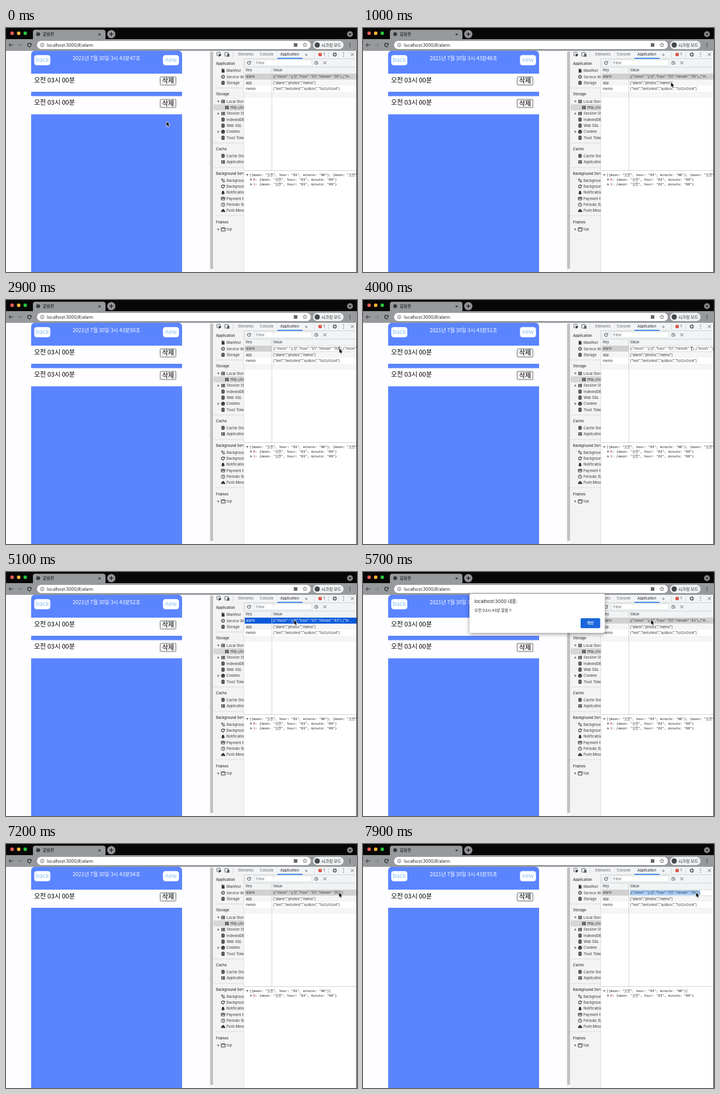
These frames come from a looping animation (600 by 417 pixels, 8 s). An HTML page with a canvas:

```html
<!DOCTYPE html>
<html lang="ko">
<head>
<meta charset="utf-8">
<style>
  html, body { margin: 0; width: 100%; height: 100%; overflow: hidden; background: #fff; }
  canvas { display: block; width: 600px; height: 417px; }
</style>
</head>
<body>
<canvas id="stage" width="600" height="417"></canvas>
<script>
const ctx = document.getElementById('stage').getContext('2d');
const UI = 'Inter, "Noto Sans CJK KR", sans-serif';
const PAGE = '"Noto Sans CJK KR", "Noto Sans CJK", sans-serif';
const MONO = '"DejaVu Sans Mono", "Noto Sans CJK KR", monospace';
const INK = '#303437', GREY = '#5f6368', BLUE = '#5b84ff';
const LOOP = 8000, STEP = 100;

// ---- drawing helpers ----
function box(x, y, w, h, fill, radius = 0, stroke) {
  ctx.beginPath();
  ctx.roundRect(x, y, w, h, radius);
  if (fill) { ctx.fillStyle = fill; ctx.fill(); }
  if (stroke) { ctx.strokeStyle = stroke; ctx.lineWidth = 1; ctx.stroke(); }
}
function disc(x, y, r, fill) {
  ctx.beginPath();
  ctx.arc(x, y, r, 0, 7);
  ctx.fillStyle = fill;
  ctx.fill();
}
function ring(x, y, r, color = GREY, width = 1, from = 0, to = 7) {
  ctx.beginPath();
  ctx.arc(x, y, r, from, to);
  ctx.strokeStyle = color;
  ctx.lineWidth = width;
  ctx.stroke();
}
function path(points, color = GREY, width = 1, fill = false) {
  ctx.beginPath();
  points.forEach(([x, y]) => ctx.lineTo(x, y));
  if (fill) { ctx.closePath(); ctx.fillStyle = color; ctx.fill(); return; }
  ctx.strokeStyle = color;
  ctx.lineWidth = width;
  ctx.stroke();
}
// y is the middle of the line of text
function text(s, x, y, size, color = INK, font = UI, weight = 400, align = 'left') {
  ctx.font = `${weight} ${size}px ${font}`;
  ctx.textAlign = align;
  ctx.fillStyle = color;
  ctx.fillText(s, x, y + size * 0.36);
}
function textWidth(s, size) {
  ctx.font = `400 ${size}px ${UI}`;
  return ctx.measureText(s).width;
}
function clipped(x, y, w, h, draw) {
  ctx.save();
  ctx.beginPath();
  ctx.rect(x, y, w, h);
  ctx.clip();
  draw();
  ctx.restore();
}
function cross(x, y, r, color = GREY, width = 1) {
  path([[x - r, y - r], [x + r, y + r]], color, width);
  path([[x - r, y + r], [x + r, y - r]], color, width);
}
function dots(x, y, color) {
  for (const d of [-3, 0, 3]) disc(x, y + d, 0.8, color);
}
function reload(x, y, r, color = GREY) {
  ring(x, y, r, color, 1.1, 0.4, 5.4);
  path([[x + r + 0.7, y - r - 0.6], [x + r + 0.7, y], [x + r - 2.4, y]], color, 1, true);
}
function triangle(x, y, open) {
  path(open ? [[x - 2, y - 1.3], [x + 2, y - 1.3], [x, y + 1.8]]
            : [[x - 1.3, y - 2], [x + 1.8, y], [x - 1.3, y + 2]], GREY, 1, true);
}

// ---- browser frame ----
function drawBrowser() {
  box(0, 0, 600, 19, '#070707');
  ['#fe5f57', '#febc2e', '#28c840'].forEach((c, i) => disc(10.5 + i * 11.2, 9, 3, c));
  box(46, 3, 124, 18, '#97999c', 4);
  disc(55, 10.5, 3.3, '#35383b');
  text('알람판', 63, 10.5, 7, '#111');
  cross(160, 11, 1.9, '#222');
  disc(180, 10.5, 7, '#929497');
  path([[176.5, 10.5], [183.5, 10.5]], '#111', 1.2);
  path([[180, 7], [180, 14]], '#111', 1.2);
  disc(588, 10.5, 5, '#85878a');
  path([[585.5, 9.5], [590.5, 9.5], [588, 12.5]], '#111', 1, true);

  box(0, 19, 600, 20, '#97999c');
  path([[12, 29], [5, 29]], '#222');
  path([[8, 26], [5, 29], [8, 32]], '#222');
  path([[20, 29], [27, 29]], '#727477');
  path([[24, 26], [27, 29], [24, 32]], '#727477');
  reload(40, 29, 3, '#222');
  box(53, 22, 468, 14, '#fff', 7);
  ring(62, 29, 3, GREY, 0.8);
  path([[62, 28.5], [62, 31]]);
  disc(62, 27.3, 0.5, GREY);
  text('localhost:3000/#/alarm', 70, 29, 7.15, '#222');
  box(492, 26, 6, 6, '#64686c');
  const star = Array.from({ length: 11 }, (_, i) => {
    const r = i % 2 ? 1.6 : 3.7, a = i * Math.PI / 5 - Math.PI / 2;
    return [511 + r * Math.cos(a), 29 + r * Math.sin(a)];
  });
  path(star, GREY, 0.8);
  box(525, 22, 52, 14, '#f1f2f3', 7);
  disc(532, 29, 4.5, '#45484c');
  text('시크릿 모드', 539, 29, 7, '#222');
  dots(588, 29, '#222');
}

// ---- alarm page ----
function pageButton(label, x, w) {
  box(x, 46.5, w, 17, '#fff', 4, '#c7dcff');
  text(label, x + w / 2, 54, 10.2, '#8fc1f5', PAGE, 300, 'center');
}
function drawPage(time, alarmCount) {
  box(0, 39, 347, 378, '#fefdff');
  box(43, 39, 258, 378, BLUE, [6, 6, 0, 0]);
  const seconds = 47 + Math.floor((time + 600) / 1000);
  text(`2021년 7월 30일 3시 43분${seconds}초`, 114, 51.5, 8.85, '#fff', PAGE);
  pageButton('back', 48.5, 27);
  pageButton('new', 268.5, 27);
  for (let i = 0; i < alarmCount; i++) {
    const y = 78 + i * 38.5;
    box(43, y, 258, 31, '#fefdff');
    text('오전 03시 00분', 48, y + 11, 11, '#000', PAGE);
    box(263.5, y + 5.5, 27, 14, '#efefef', 1, '#777');
    text('삭제', 277, y + 12.3, 10.9, '#000', PAGE, 400, 'center');
  }
  box(347, 39, 8, 378, '#f8f8f8');
  box(349, 40, 5, 372, '#c1c1c1', 2.5);
}

// ---- developer tools ----
const icons = {
  doc: (x, y) => { box(x - 2.3, y - 3.2, 4.8, 6.4, INK); box(x + 0.8, y - 3.2, 1.7, 1.8, '#bbb'); },
  gear: (x, y) => { ring(x, y, 2.3, GREY, 1.8); },
  data: (x, y) => {
    box(x - 3, y - 3.3, 6, 6.6, INK, 2);
    for (const d of [-1.1, 1.1]) path([[x - 3, y + d], [x + 3, y + d]], '#ddd', 0.6);
  },
  grid: (x, y) => {
    for (const dy of [-2.7, -0.7, 1.3]) { box(x - 3, y + dy, 2.5, 1.5, INK); box(x, y + dy, 3.2, 1.5, INK); }
  },
  cookie: (x, y) => { disc(x, y, 3.2, INK); disc(x - 1, y - 1, 0.6, '#eee'); disc(x + 1, y + 1, 0.6, '#eee'); },
  arrows: (x, y) => {
    path([[x - 3, y - 1], [x - 1.5, y - 3], [x, y - 1]], INK, 0.9);
    path([[x - 1.5, y - 3], [x - 1.5, y + 2]], INK, 0.9);
    path([[x, y + 1], [x + 1.5, y + 3], [x + 3, y + 1]], INK, 0.9);
    path([[x + 1.5, y + 3], [x + 1.5, y - 2]], INK, 0.9);
  },
  sync: (x, y) => reload(x, y, 2.5, INK),
  bell: (x, y) => { box(x - 2, y - 3, 4, 5, INK, [2, 2, 0, 0]); box(x - 3, y + 1.2, 6, 1, INK); disc(x, y + 2.8, 0.8, INK); },
  card: (x, y) => { box(x - 3, y - 2.3, 6, 4.6, null, 0.5, INK); box(x - 3, y - 1.2, 6, 1.4, INK); },
  clock: (x, y) => { ring(x, y, 3, INK, 0.9); path([[x, y - 2], [x, y], [x + 1.5, y + 1]], INK, 0.8); },
  cloud: (x, y) => { disc(x - 1.6, y + 0.7, 1.7, INK); disc(x + 0.3, y - 0.6, 2.2, INK); disc(x + 2.1, y + 0.9, 1.5, INK); },
  frame: (x, y) => { box(x - 3, y - 2.5, 6.5, 5.5, null, 0, INK); box(x - 3, y - 3, 6.5, 1.5, INK); }
};
const sections = [
  ['Application', 61, 73, ['doc:Manifest', 'gear:Service Workers', 'data:Storage']],
  ['Storage', 113, 125.5, ['grid:Local Storage', 'grid:http://localhost:3000', 'grid:Session Storage',
    'data:IndexedDB', 'data:Web SQL', 'cookie:Cookies', 'data:Trust Tokens']],
  ['Cache', 207, 218.5, ['data:Cache Storage', 'grid:Application Cache']],
  ['Background Services', 249, 260.5, ['arrows:Background Fetch', 'sync:Background Sync', 'bell:Notifications',
    'card:Payment Handler', 'clock:Periodic Background Sync', 'cloud:Push Messaging']],
  ['Frames', 331.5, 344, ['frame:top']]
];
const folded = { 'Local Storage': true, 'Session Storage': false, Cookies: false, top: false };

function drawSidebar() {
  box(355, 52, 52, 365, '#f3f3f3');
  clipped(355, 52, 52, 365, () => {
    box(355, 130.5, 52, 10.3, '#d6d6d6');
    for (const [title, y, top, items] of sections) {
      if (y > 61) box(355, y - 11, 52, 0.7, '#d4d4d4');
      text(title, 359, y, 6, INK, UI, 500);
      items.forEach((item, i) => {
        const cut = item.indexOf(':'), label = item.slice(cut + 1);
        const row = top + i * 10.35, indent = label.startsWith('http') ? 6.5 : 0;
        if (label in folded) triangle(363, row, folded[label]);
        icons[item.slice(0, cut)](371 + indent, row);
        text(label, 377 + indent, row, 6);
      });
    }
  });
  box(406.5, 52, 1, 365, '#cacdd1');
}

function drawToolbars() {
  box(355, 39, 245, 13.5, '#f1f3f4');
  box(360.5, 41.5, 6, 6, null, 1, GREY);
  path([[363, 44], [368.5, 46], [366, 47], [365, 49.5]], '#222', 1, true);
  box(374, 42, 6, 6, null, 0.5, GREY);
  box(378, 44, 4, 5, GREY);
  box(387.5, 41, 0.7, 9, '#ccc');
  text('Elements', 397, 45.3, 6, GREY);
  text('Console', 434, 45.3, 6, GREY);
  text('Application', 469, 45.3, 6.05, '#222');
  box(355, 52, 245, 0.8, '#cacdd1');
  box(464, 51, 43, 1.5, '#1a73e8');
  text('»', 511, 45, 8, GREY);
  box(527, 41, 0.7, 9, '#ccc');
  disc(537, 45.3, 3, '#db3b2f');
  text('!', 537, 45.3, 5, '#fff', UI, 700, 'center');
  text('1', 542.5, 45.3, 6);
  box(551, 41, 0.7, 9, '#ccc');
  ring(562, 45.3, 2.5, GREY, 1.8);
  dots(577, 45.3, GREY);
  cross(592, 45.3, 2.4);

  box(407, 53, 193, 13.5, '#f1f3f4');
  reload(415.5, 59.5, 2.6);
  box(424.5, 54.5, 98, 10, '#fff', 0, '#dfe1e4');
  text('Filter', 428, 59.5, 6, GREY);
  ring(530.5, 59.5, 2.8);
  path([[528.5, 57.5], [532.5, 61.5]]);
  cross(545, 59.5, 2.4);
}

const VALUE_SIZE = 5.8;
const entry = minute => `{"moon":"오전","hour":"03","minute":"${minute}"}`;

function drawTable({ mode, minute, caret, single }) {
  box(407, 66.5, 193, 11.5, '#f1f3f4');
  box(407, 66.5, 193, 0.7, '#cacdd1');
  text('Key', 410, 72.3, 6);
  text('Value', 456.5, 72.3, 6);
  box(407, 78, 193, 166, '#fff');
  box(407, 88.3, 193, 10.3, '#f5f5f5');
  box(407, 108.9, 193, 10.3, '#f5f5f5');

  const editing = mode === 'edit' || mode === 'editAll';
  const active = mode === 'active' || mode === 'word';
  box(408, 78, editing ? 46 : 192, 10.3, active ? '#0b5ad9' : '#d0d0d0');
  text('alarm', 410, 83.3, VALUE_SIZE, active ? '#fff' : INK);
  const head = '[' + entry(minute).slice(0, -2);
  let value = '[' + entry(minute) + (single ? ']' : editing ? ',' + entry('00') + ']' : ',{"m…');
  const start = 456.5, caretX = start + textWidth(head, VALUE_SIZE);
  if (editing) box(454.5, 78.3, 146, 9.8, '#fff', 0, '#d9dce0');
  if (mode === 'editAll') box(start, 79, textWidth(value, VALUE_SIZE), 8.6, '#a9cffa');
  if (mode === 'word') {
    const w = textWidth('00', VALUE_SIZE);
    box(caretX - w, 78.7, w, 9, '#7fb2f5');
  }
  clipped(454, 78, 146, 11, () => text(value, start, 83.3, VALUE_SIZE, active ? '#fff' : INK));
  if (caret) box(caretX, 79.5, 0.8, 7.5, '#000');

  text('app', 410, 93.5, VALUE_SIZE);
  text('["alarm","photos","memo"]', start, 93.5, VALUE_SIZE);
  text('memo', 410, 103.8, VALUE_SIZE);
  text('["test","test\\ntest","a\\nb\\nc","1\\n2\\n3\\n4"]', start, 103.8, VALUE_SIZE);
  box(454, 67, 0.8, 177, '#cacdd1');
  box(407, 243.3, 193, 1, '#c4c7ca');
}

function drawPreview(count) {
  box(407, 244.3, 193, 173, '#fff');
  const item = '{moon: "오전", hour: "03", minute: "00"}';
  clipped(407, 244, 192, 173, () => {
    triangle(412.5, 251, true);
    text('[' + Array(count).fill(item).join(', ') + ']', 416, 251, 5.65, '#222', MONO);
    for (let i = 0; i < count; i++) {
      const y = 259 + i * 8.3;
      triangle(419, y, false);
      text(i, 422.5, y, 5.65, '#b0203a', MONO);
      text(':', 426, y, 5.65, '#222', MONO);
      text(item, 433, y, 5.65, '#222', MONO);
    }
  });
  box(599, 39, 1, 378, '#2a2a2a');
}

function drawDialog(opacity) {
  if (opacity <= 0) return;
  ctx.save();
  ctx.globalAlpha = opacity;
  const scale = 0.955 + 0.045 * opacity;
  ctx.translate(298, 69);
  ctx.scale(scale, scale);
  ctx.translate(-298, -69 - (1 - opacity) * 5);
  ctx.shadowColor = 'rgba(0,0,0,.4)';
  ctx.shadowBlur = 7;
  ctx.shadowOffsetY = 2;
  box(182, 37, 231.5, 67, '#fff', 3);
  ctx.shadowColor = 'transparent';
  text('localhost:3000 내용:', 190.5, 50.5, 7.75, '#222');
  text('오전 03시 43분 알람 !!', 190.5, 65.5, 6.5, '#222');
  box(372, 79, 33.5, 17, '#1a67dc', 2);
  text('확인', 388.7, 87.3, 6, '#fff', UI, 700, 'center');
  ctx.restore();
}

// ---- motion ----
const CLICK_OK = 6400, HIDE = 3200, SHOW = 4800, ALERT = 5400;
// [start, end, x, y]: glide to the point during the span
const moves = [
  [0, 1300, 566, 82.5], [1900, 2300, 570, 83], [4800, 5100, 492.5, 82],
  [5700, 6200, 396.5, 86.5], [6600, 7100, 569.5, 83]
];
function cursorAt(time) {
  let x = 274.5, y = 160;
  for (const [start, end, toX, toY] of moves) {
    const p = Math.min(1, Math.max(0, (time - start) / (end - start)));
    const eased = p * p * (3 - 2 * p);
    x += (toX - x) * eased;
    y += (toY - y) * eased;
  }
  return [x, y];
}
function drawCursor(time) {
  if (time >= HIDE && time < SHOW) return;
  const [x, y] = cursorAt(time);
  const shape = [[0, 0], [0, 7.6], [1.7, 6.1], [2.9, 8.8], [4.2, 8.2], [3, 5.6], [5.3, 5.5], [0, 0]]
    .map(([dx, dy]) => [x + dx, y + dy]);
  path(shape, '#fff', 1.3);
  path(shape, '#000', 1, true);
}
function latest(time, steps) {
  return steps.filter(([at]) => time >= at).pop()[1];
}

function render(time) {
  const single = time >= CLICK_OK, count = single ? 1 : 2;
  const mode = latest(time, [[0, 'idle'], [1500, 'active'], [1700, 'word'], [2000, 'edit'],
    [4800, 'active'], [ALERT, 'idle'], [7300, 'active'], [7500, 'editAll']]);
  const minute = latest(time, [[0, '00'], [3200, '0'], [3400, ''], [4300, '4'], [4500, '43'], [CLICK_OK, '00']]);
  drawPage(time, count);
  drawBrowser();
  drawToolbars();
  drawSidebar();
  drawTable({ mode, minute, single, caret: mode === 'edit' });
  drawPreview(count);
  const fadeIn = Math.min(1, (time - ALERT + 100) / 200);
  const fadeOut = Math.min(1, 1 - (time - CLICK_OK) / 220);
  drawDialog(Math.min(fadeIn, fadeOut));
  drawCursor(time);
}

function tick() {
  render(Math.floor(performance.now() % LOOP / STEP) * STEP);
  requestAnimationFrame(tick);
}
tick();
</script>
</body>
</html>
```
